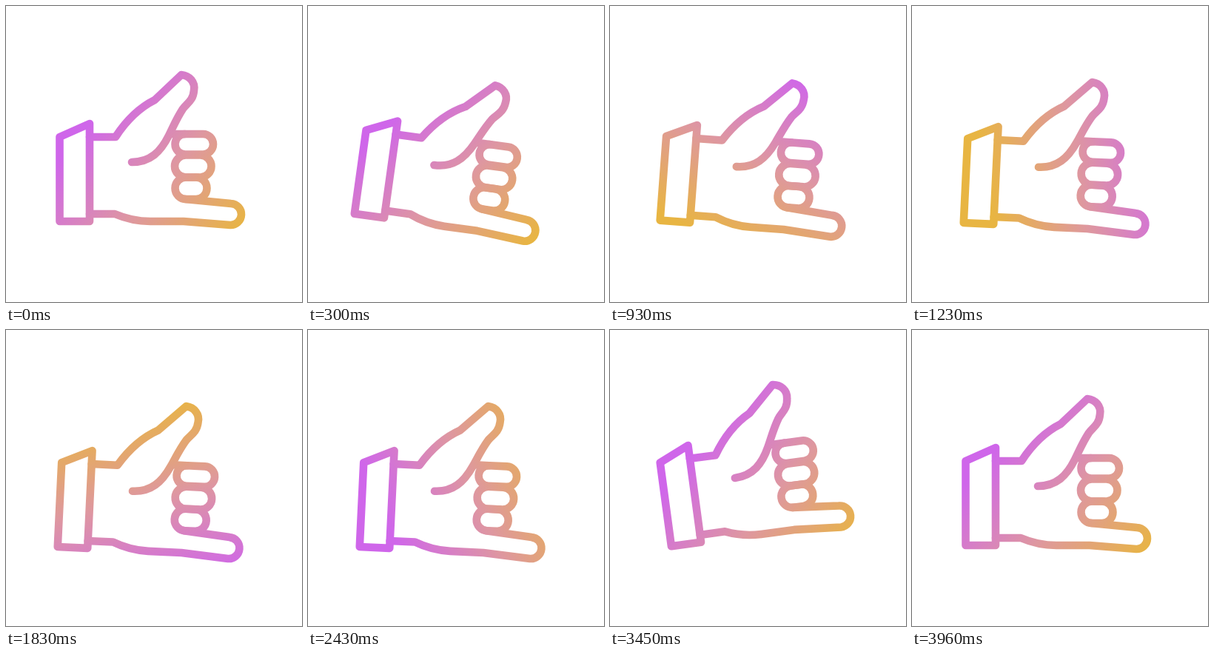
These frames come from a looping animation (400x400 px, 4.99 s). An HTML page:

```html
<!DOCTYPE html>
<html lang="en">
<head>
<meta charset="utf-8">
<title>Shaka</title>
<style>
  html, body { margin: 0; width: 100%; height: 100%; overflow: hidden; background: #fff; }
  svg { display: block; width: 100%; height: 100%; }
</style>
</head>
<body>
<svg viewBox="0 0 400 400">
  <defs>
    <linearGradient id="tint" gradientUnits="userSpaceOnUse" x1="-125" y1="0" x2="125" y2="0">
      <stop offset="0" stop-color="#cf66ea"/>
      <stop offset="0.5" stop-color="#de97a0"/>
      <stop offset="1" stop-color="#e8b542"/>
    </linearGradient>
    <!-- The hand is a mask, so the gradient turns independently of it. -->
    <mask id="shape" maskUnits="userSpaceOnUse" x="0" y="0" width="400" height="400">
      <g id="hand" fill="none" stroke="#fff" stroke-width="10.6" stroke-linecap="round" stroke-linejoin="round">
        <path d="M72.500 177L113 159V291H72.500Z"/>
        <path d="M113 177H148C161 157 179 138 201 127L237 93C248 94 256 103 254 114C253 128 244 132 239 139C231 151 226 163 220 175C209 197 195 211 170 211"/>
        <path d="M223 173H242"/>
        <rect x="228.500" y="173" width="51.500" height="27.500" rx="13.700"/>
        <rect x="228" y="201.500" width="49.500" height="30" rx="15"/>
        <rect x="228.500" y="231.500" width="43" height="29.500" rx="14.700"/>
        <path d="M242 261L304 267A14.500 14.500 0 0 1 303 296L240 291H195C175 291 161 287 147 281H113"/>
      </g>
    </mask>
  </defs>
  <rect width="400" height="400" fill="url(#tint)" mask="url(#shape)"/>
</svg>
<script>
  const LOOP = 4990, STEP = 30, REST = 3960;
  const hand = document.getElementById('hand');
  const tint = document.getElementById('tint');

  // Swing in degrees: a 600 ms sway, then a small rebound to rest.
  const swing = [[0, 0]];
  for (let t = 186; t < 3300; t += 600) swing.push([t, 15.5], [t + 300, -8.5]);
  swing.push([3780, 2.8], [REST, 0]);

  const drop = [[0, 0], [360, 7.9], [3186, 7.9], [3486, -15], [3780, 0]];
  const turn = [40, 71, 170, 257, 337, 375, 400];

  // Keyframes joined by sine easing.
  function eased(keys, t) {
    const i = keys.findIndex(k => k[0] > t);
    if (i < 0) return keys[keys.length - 1][1];
    const [t0, a] = keys[i - 1], [t1, b] = keys[i];
    return a + (b - a) * (1 - Math.cos(Math.PI * (t - t0) / (t1 - t0))) / 2;
  }

  // Smooth curve through evenly spaced values.
  function spline(values, x) {
    const last = values.length - 1;
    x = Math.min(last, Math.max(0, x));
    const i = Math.min(last - 1, Math.floor(x)), u = x - i;
    const slope = n => n <= 0 || n >= last ? 0 : (values[n + 1] - values[n - 1]) / 2;
    const s = u * u * (3 - 2 * u);
    return values[i] + (values[i + 1] - values[i]) * s
      + slope(i) * u * (1 - u) ** 2 - slope(i + 1) * u * u * (1 - u);
  }

  function draw(ms) {
    const t = Math.min(REST, Math.floor(ms % LOOP / STEP) * STEP);
    const y = eased(drop, t);
    hand.setAttribute('transform', `translate(${0.17 * y} ${y}) rotate(${eased(swing, t)} 194 203)`);
    tint.setAttribute('gradientTransform', `translate(225 220) rotate(${spline(turn, (t - 30) / 600)})`);
  }

  const start = performance.now();
  function tick() {
    draw(performance.now() - start);
    requestAnimationFrame(tick);
  }
  tick();
</script>
</body>
</html>
```
